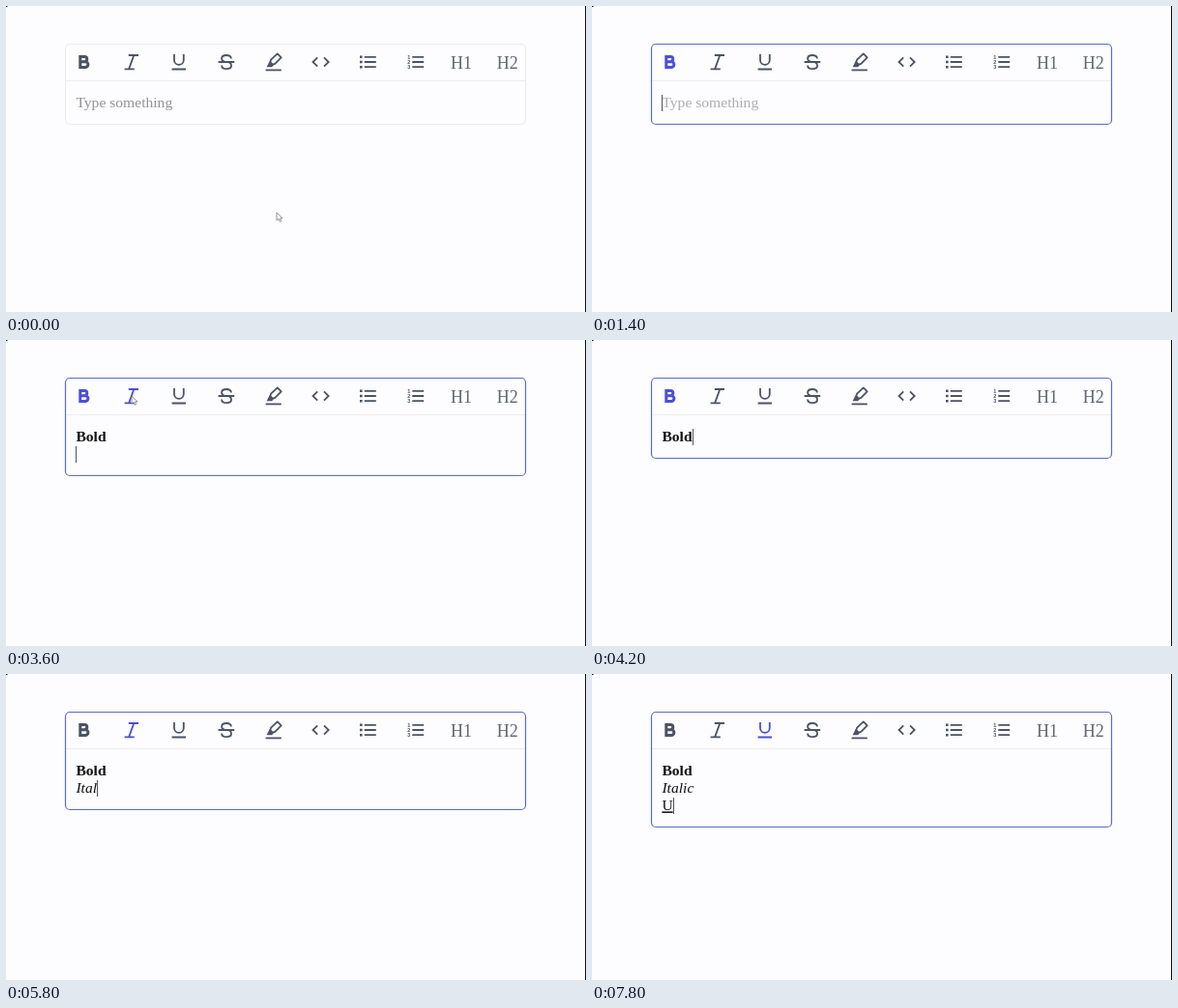
An HTML page that plays this animation: 600x317 px, repeating every 8000 ms.

```html
<!DOCTYPE html>
<html lang="en">
<head>
<meta charset="utf-8">
<title>Text editor</title>
<style>
  html, body { margin: 0; width: 100%; height: 100%; overflow: hidden; background: #fdfcfe; }
  svg { display: block; width: 600px; height: 317px; }
  text { font-family: "Liberation Serif", "Times New Roman", serif; white-space: pre; }
  .tool { color: #4b5364; fill: none; stroke: currentColor; stroke-width: 1.8; }
  .tool.on { color: #4c4fd6; }
  .solid { fill: currentColor; stroke: none; }
  .head { fill: #626772; font-size: 18px; }
  .num { fill: currentColor; stroke: none; font: 700 5.5px "Liberation Sans", sans-serif; }
  .line { font-size: 15.6px; fill: #111; }
</style>
</head>
<body>
<svg viewBox="0 0 600 317">
  <rect width="600" height="317" fill="#fdfcfe"/>
  <rect width="1.5" height="1" fill="#111"/>
  <rect x="599" width="1" height="317" fill="#111"/>

  <path d="M62 77.5H537" stroke="#ededf1"/>
  <rect id="box" x="61.5" y="39.5" width="476" rx="4.5" fill="none"/>

  <g class="tool" id="bold" stroke-linejoin="miter">
    <path style="stroke-width:3" d="M76.8 52.5h4.4a2.6 2.6 0 0 1 0 5.2h-4.4zM76.8 57.7h5.2a2.9 2.9 0 0 1 0 5.8h-5.2z"/>
  </g>
  <g class="tool" id="italic">
    <path d="M126.8 51h10.2M122.6 65.4h10.2M132.3 51l-5.2 14.4"/>
  </g>
  <g class="tool" id="under">
    <path d="M174 50v5.9a4.9 4.9 0 0 0 9.8 0V50M171.6 65.5h14.4"/>
  </g>
  <g class="tool">
    <path d="M232.9 54.6c0-2.2-2-3.6-4.9-3.6s-4.9 1.3-4.9 3.5c0 1.8 1.4 2.7 3.2 3.4M219.6 58h16.6M230.8 58.4c1.6.7 2.3 1.7 2.3 3.1 0 2.3-2 3.7-4.9 3.7s-5.1-1.4-5.1-3.7"/>
  </g>
  <g class="tool">
    <path d="M273.3 58.2l.8-2.5 6.7-6.3 3.9 3.9-6.4 6.6-2.4.8z" stroke-linejoin="round"/>
    <path class="solid" d="M272.6 57.3l4.2 4.2-1.8 1.8h-5.4z"/>
    <path d="M268.6 66.4h16.2"/>
  </g>
  <g class="tool">
    <path d="M322.2 53.3l-4.7 4.7 4.7 4.7M329 53.3l4.7 4.7-4.7 4.7"/>
  </g>
  <g class="tool">
    <path d="M370.8 52.8h12M370.8 58h12M370.8 63.2h12"/>
    <path d="M366 52.8h2.6M366 58h2.6M366 63.2h2.6" style="stroke-width:2.4"/>
  </g>
  <g class="tool">
    <path d="M420.3 52.8h11.9M420.3 58h11.9M420.3 63.2h11.9"/>
    <text class="num" x="415.3" y="54.8">1</text>
    <text class="num" x="415.3" y="60">2</text>
    <text class="num" x="415.3" y="65.3">3</text>
  </g>
  <text class="head" x="460" y="64.5">H1</text>
  <text class="head" x="507.8" y="64.5">H2</text>

  <text class="line" id="hint" x="72.4" y="105.4">Type something</text>
  <text class="line" x="72.4" y="105.4" font-weight="700"></text>
  <text class="line" x="72.4" y="123.4" font-style="italic"></text>
  <text class="line" x="72.4" y="141.4" text-decoration="underline"></text>
  <path id="caret" stroke="#555"/>
  <path id="mouse" d="M0 0v8.2l2-1.7 1.3 2.8 1.4-.6-1.3-2.7h2.6z" fill="#fff" stroke="#777" stroke-width=".8"/>
</svg>
<script>
const LOOP = 8000, STEP = 200;
const $ = id => document.getElementById(id);
const lines = [...document.querySelectorAll('.line:not(#hint)')];

// typing: [first key, time per step, letters per step, word]
const words = [[1600, 200, 1, 'Bold'], [5600, 200, 2, 'Italic'], [7800, 200, 1, 'U']];

// pointer paths: [time, x, y] points; hidden outside each path
const paths = [
  [[0, 280, 214], [200, 280, 214], [1000, 82, 58], [1200, 82, 58]],
  [[3000, 173, 86], [3400, 130, 58], [3800, 130, 58]],
  [[5200, 84, 58], [5400, 130, 58]],
  [[7000, 132, 60], [7200, 179, 59], [7400, 179, 59]]
];

// caret is lit in these spans
const lit = [[1200, 3000], [3600, 4600], [5000, 6600], [6800, LOOP]];

const within = (t, a, b) => t >= a && t < b;

function pointer(t) {
  const path = paths.find(p => t >= p[0][0] && t <= p[p.length - 1][0]);
  if (!path) return null;
  const i = Math.max(1, path.findIndex(p => p[0] >= t));
  const [t0, x0, y0] = path[i - 1], [t1, x1, y1] = path[i];
  const k = (t - t0) / (t1 - t0);
  return [x0 + (x1 - x0) * k, y0 + (y1 - y0) * k];
}

function rowAt(t) {
  if (t >= 6800) return 2;
  return within(t, 2400, 4200) || t >= 5000 ? 1 : 0;
}

function draw(time) {
  const t = Math.floor(time / STEP) * STEP;
  const focus = t >= 1200, row = rowAt(t);

  words.forEach(([start, gap, size, word], i) => {
    const n = t < start ? 0 : (Math.floor((t - start) / gap) + 1) * size;
    lines[i].textContent = word.slice(0, n);
  });
  $('hint').style.display = t < 1600 ? '' : 'none';
  $('hint').style.fill = focus ? '#adadb0' : '#929294';

  $('box').setAttribute('height', 83 + row * 18);
  $('box').setAttribute('stroke', focus ? '#5a6bd0' : '#ebebef');
  $('box').setAttribute('stroke-width', focus ? 1.2 : 1);

  $('bold').classList.toggle('on', within(t, 1200, 5200));
  $('italic').classList.toggle('on', within(t, 3600, 4200) || within(t, 5400, 7000));
  $('under').classList.toggle('on', t >= 7200);

  const el = lines[row];
  const width = el.textContent ? el.getComputedTextLength() : 0;
  $('caret').setAttribute('d', `M${Math.round(72.4 + width) + .5} ${92 + row * 18}v17`);
  $('caret').style.display = lit.some(([a, b]) => within(t, a, b)) ? '' : 'none';

  const at = pointer(t);
  $('mouse').style.display = at ? '' : 'none';
  if (at) $('mouse').setAttribute('transform', `translate(${at})`);
}

const begin = performance.now();
function tick() {
  draw((performance.now() - begin) % LOOP);
  requestAnimationFrame(tick);
}
tick();
</script>
</body>
</html>
```
